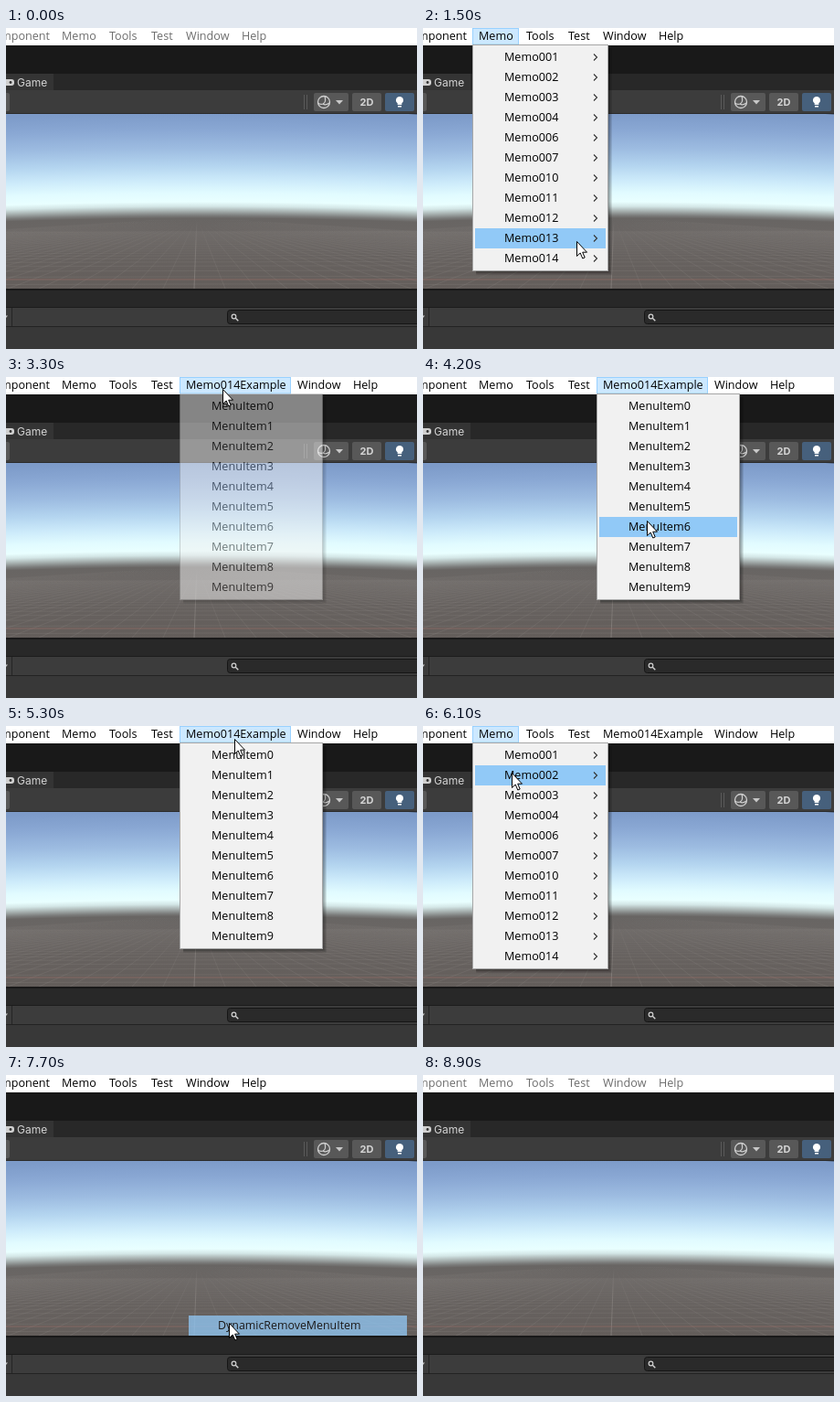
Recreate the animation shown at these times as an HTML page with a canvas. Size 450 by 351 pixels, loop 9 s.

```html
<!DOCTYPE html>
<html lang="en">
<head>
<meta charset="utf-8">
<title>Dynamic menu items</title>
<style>
html, body { margin: 0; width: 450px; height: 351px; overflow: hidden; background: #191919; }
canvas, svg { position: absolute; left: 0; top: 0; display: block; }
text { white-space: pre; }
.menu { font: 12.6px "Open Sans", "Noto Sans", sans-serif; }
.sub { font-size: 12.4px; }
.ui { font: 12px Inter, Roboto, sans-serif; fill: #d4d4d4; }
</style>
</head>
<body>
<canvas id="scene" width="450" height="351"></canvas>
<svg id="ui" width="450" height="351" viewBox="0 0 450 351"></svg>
<script>
const LOOP = 9000, STEP = 100, ROW = 22;
const svg = document.getElementById('ui');

function add(parent, tag, attrs, text) {
  const el = document.createElementNS('http://www.w3.org/2000/svg', tag);
  for (const k in attrs) el.setAttribute(k, attrs[k]);
  if (text) el.textContent = text;
  parent.appendChild(el);
  return el;
}
const box = (p, x, y, width, height, fill, more) => add(p, 'rect', { x, y, width, height, fill, ...more });
const label = (p, x, y, text, more) => add(p, 'text', { x, y, class: 'menu', ...more }, text);
const path = (p, d, more) => add(p, 'path', { d, fill: 'none', ...more });
const show = (el, opacity) => { el.style.opacity = opacity; el.style.display = opacity > 0 ? '' : 'none'; };

// Sky, ground and perspective grid
function drawScene() {
  const c = document.getElementById('scene').getContext('2d');
  const g = c.createLinearGradient(0, 94, 0, 285);
  const stops = [[94, '#7d9bc9'], [112, '#8aa8d4'], [132, '#9dbce1'], [150, '#b3d4ef'], [166, '#cceafa'],
    [180, '#e1fbff'], [190, '#e9ffff'], [195, '#d3e6e6'], [200, '#a8b2b1'], [205, '#7b7c7b'],
    [208, '#686563'], [220, '#6a6664'], [285, '#635d5a']];
  for (const [y, col] of stops) g.addColorStop((y - 94) / 191, col);
  c.save();
  c.beginPath();
  c.rect(0, 94, 450, 191);
  c.clip();
  for (let x = 0; x < 450; x++) {
    const dip = 4 * ((x - 215) / 225) ** 2;
    c.setTransform(1, 0, 0, 1, 0, dip);
    c.fillStyle = g;
    c.fillRect(x, 90, 1, 196);
  }
  c.setTransform(1, 0, 0, 1, 0, 0);
  const fade = (r, gr, b, a) => {
    const f = c.createLinearGradient(0, 209, 0, 285);
    f.addColorStop(0, `rgba(${r},${gr},${b},0)`);
    f.addColorStop(.4, `rgba(${r},${gr},${b},${a * .7})`);
    f.addColorStop(1, `rgba(${r},${gr},${b},${a})`);
    return f;
  };
  const line = (x1, y1, x2, y2, style) => {
    c.strokeStyle = style;
    c.beginPath();
    c.moveTo(x1, y1);
    c.lineTo(x2, y2);
    c.stroke();
  };
  c.lineWidth = 1;
  const thin = fade(175, 170, 165, .13), bold = fade(190, 185, 180, .3);
  for (let i = -36; i <= 36; i++) line(209, 207, 206 + i * 34, 285, i ? thin : bold);
  for (let d = 8; d < 40; d++) {
    const y = 207 + 580 / d;
    line(0, y + 1, 450, y, thin);
  }
  line(0, 275, 450, 275, 'rgba(165,115,105,.5)');
  c.restore();
}

function drawEditor() {
  box(svg, 0, 0, 450, 19, '#fff');
  box(svg, 0, 19, 450, 31, '#191919');
  box(svg, 0, 50, 450, 18, '#282828');
  box(svg, 0, 50, 52, 18, '#343434');
  box(svg, 0, 68, 450, 26, '#3c3c3c');
  box(svg, 0, 93, 450, 1, '#2b2b2b');
  box(svg, -4, 56, 13, 7, '#d0d0d0', { rx: 3 });
  add(svg, 'circle', { cx: 5, cy: 59.5, r: 1.4, fill: '#343434' });
  add(svg, 'text', { x: 12, y: 64, class: 'ui' }, 'Game');

  box(svg, -6, 71, 10, 20, '#585858', { rx: 2 });
  for (const x of [326, 329]) box(svg, x, 73, 1, 16, '#5a5a5a');
  box(svg, 337, 71, 38, 20, '#585858', { rx: 2 });
  box(svg, 379, 71, 32, 20, '#585858', { rx: 2 });
  box(svg, 415, 71, 32, 20, '#46607c', { rx: 2 });
  add(svg, 'circle', { cx: 348, cy: 81, r: 6.5, fill: 'none', stroke: '#d0d0d0', 'stroke-width': 1.3 });
  path(svg, 'M349 74.5Q351 81 347 83Q344 84 341.5 82M347 83Q350 85 354 82', { stroke: '#d0d0d0', 'stroke-width': 1.2 });
  path(svg, 'M361 79h8l-4 4.5z', { fill: '#c8c8c8' });
  add(svg, 'text', { x: 395, y: 85, class: 'ui', 'text-anchor': 'middle', style: 'font-size:11px;font-weight:700' }, '2D');
  path(svg, 'M431 75a4 4 0 0 1 2.3 7.3V84h-4.6v-1.7A4 4 0 0 1 431 75zM429 85h4v1.6h-4z', { fill: '#fff' });

  box(svg, 0, 285, 450, 2, '#191919');
  box(svg, 0, 287, 450, 18, '#282828');
  box(svg, 0, 305, 450, 1, '#1c1c1c');
  box(svg, 0, 306, 450, 20, '#3c3c3c');
  box(svg, 0, 326, 450, 1, '#222');
  box(svg, 0, 327, 450, 24, '#383838');
  box(svg, 6, 306, 1, 20, '#242424');
  path(svg, 'M-3 314.500h5l-2.500 3z', { fill: '#c4c4c4' });
  box(svg, 242.500, 308.500, 230, 15, '#2a2a2a', { rx: 3, stroke: '#151515' });
  add(svg, 'circle', { cx: 249.500, cy: 315.500, r: 2.300, fill: 'none', stroke: '#d2d2d2', 'stroke-width': 1.200 });
  path(svg, 'M251.300 317.300l3 3', { stroke: '#d2d2d2', 'stroke-width': 1.400 });
}

function makeHeader(x, w) {
  return box(svg, x + .5, .5, w - 1, 17.5, '#cce8ff', { stroke: '#99d1ff' });
}

function makePanel(x, y, w, rows, tx, arrows, cls = '') {
  const g = add(svg, 'g', {}), h = rows.length * ROW + 6;
  for (let i = 4; i > 0; i--) box(g, x + 4, y + 4, w - 4 + i, h - 4 + i, '#000', { opacity: .1, rx: 1 });
  box(g, x + .5, y + .5, w - 1, h - 1, '#f1f1f1', { stroke: '#a6a6a6' });
  const mark = box(g, x + 3, 0, w - 6, ROW, '#91c9f7');
  rows.forEach((name, i) => {
    const top = y + 3 + i * ROW;
    label(g, tx, top + 15, name, { class: 'menu ' + cls });
    if (arrows) path(g, `M${x + w - 16} ${top + 7.5}l3.500 3.500-3.500 3.500`, { stroke: '#333', 'stroke-width': 1.1 });
  });
  return {
    rows: rows.length,
    inside: (px, py) => px >= x + 3 && px < x + w && py >= y + 3 && py < y + h - 3,
    rowAt: py => Math.floor((py - y - 3) / ROW),
    update(opacity, row) {
      show(g, opacity);
      mark.setAttribute('y', y + 3 + row * ROW);
      show(mark, row < 0 ? 0 : 1);
    }
  };
}

drawScene();
drawEditor();

const memoHead = makeHeader(54, 51), newHead = makeHeader(190, 122);
const bar = add(svg, 'g', {});
label(bar, 48, 13, 'Component', { 'text-anchor': 'end' });
label(bar, 61, 13, 'Memo');
label(bar, 113, 13, 'Tools');
label(bar, 159, 13, 'Test');
const newText = label(bar, 197, 13, 'Memo014Example');
const windowText = label(bar, 197, 13, 'Window'), helpText = label(bar, 258, 13, 'Help');

const memoNames = [1, 2, 3, 4, 6, 7, 10, 11, 12, 13, 14].map(n => 'Memo' + String(n).padStart(3, '0'));
const itemNames = Array.from({ length: 10 }, (_, i) => 'MenuItem' + i);
const subNames = ['DynamicAddMenuItem', 'DynamicRemoveMenuItem'];
const memo = makePanel(54, 18, 149, memoNames, 89, true);
const items = makePanel(190, 18, 157, itemNames, 225, false);
const sub = makePanel(197, 238, 245, subNames, 232, false, 'sub');

// The chosen command lingers briefly after its menu closes
const picked = subNames.map((name, i) => {
  const g = add(svg, 'g', {}), y = 241 + i * ROW;
  box(g, 200, y, 239, ROW, '#91c9f7');
  label(g, 232, y + 15, name, { class: 'menu sub' });
  return g;
});

const pointer = path(svg, 'M.5.5V16.500L4.200 13l2.600 6 2.400-1-2.500-5.800H11.500z',
  { fill: '#fff', stroke: '#000', 'stroke-width': 1 });

// time, x, y of the pointer tip
const moves = [
  [100, 424, 150], [300, 370, 110], [700, 92, 14], [800, 80, 12], [1000, 82, 13], [1100, 90, 24],
  [1500, 168, 233], [1600, 176, 245], [2000, 182, 244], [2100, 208, 246], [2200, 230, 245],
  [2500, 230, 245], [2700, 231, 225], [3200, 236, 14], [3300, 237, 13], [3500, 237, 13],
  [3700, 239, 30], [4500, 248, 233], [4700, 248, 215], [5300, 250, 14], [5400, 248, 13],
  [5500, 241, 12], [5800, 100, 11], [5900, 84, 11], [6000, 86, 16], [6500, 140, 190],
  [6600, 146, 233], [6700, 160, 248], [7100, 182, 250], [7200, 214, 252], [7400, 243, 270],
  [7700, 244, 271], [7900, 258, 264], [8400, 438, 190], [8500, 460, 180]
];

function tip(t) {
  if (t < moves[0][0] || t >= 8500) return null;
  const i = moves.findIndex(m => m[0] > t);
  const [t0, x0, y0] = moves[i - 1], [t1, x1, y1] = moves[i];
  const k = (t - t0) / (t1 - t0);
  return [Math.round(x0 + (x1 - x0) * k), Math.round(y0 + (y1 - y0) * k)];
}

// Half strength on the first step, then full until closed
const opening = (t, from, to) => t < from || t >= to ? 0 : t < from + STEP ? .5 : 1;
const lingering = (t, from) => t < from || t >= from + 300 ? 0 : [1, .75, .35][(t - from) / STEP];

function header(el, open, hover) {
  el.setAttribute('fill', open ? '#cce8ff' : '#e5f3ff');
  el.setAttribute('stroke', open ? '#99d1ff' : '#cce8ff');
  show(el, open || hover ? 1 : 0);
}

function draw(now) {
  const t = Math.floor(now % LOOP / STEP) * STEP;
  const p = tip(t), [x, y] = p || [-99, -99];
  const extra = t >= 2600 && t < 7700;
  const memoOn = opening(t, 900, 2500) || opening(t, 5900, 7600);
  const itemsOn = opening(t, 3300, 5400);
  const subOn = opening(t, 1900, 2500) || opening(t, 7000, 7600);

  bar.setAttribute('fill', t < 800 || t >= 8900 ? '#6d6d6d' : '#000');
  show(newText, extra ? 1 : 0);
  windowText.setAttribute('x', extra ? 319 : 197);
  helpText.setAttribute('x', extra ? 380 : 258);

  const onBar = y >= 0 && y < 18;
  header(memoHead, memoOn > 0, onBar && x >= 54 && x < 105);
  header(newHead, itemsOn > 0, extra && onBar && x >= 190 && x < 312);

  const inSub = subOn && sub.inside(x, y);
  memo.update(memoOn, inSub ? memo.rows - 1 : memo.inside(x, y) ? memo.rowAt(y) : -1);
  items.update(itemsOn, items.inside(x, y) ? items.rowAt(y) : -1);
  sub.update(subOn, inSub ? sub.rowAt(y) : -1);
  show(picked[0], lingering(t, 2500));
  show(picked[1], lingering(t, 7600));

  show(pointer, p ? 1 : 0);
  pointer.setAttribute('transform', `translate(${x} ${y})`);
}

const start = performance.now();
function tick() {
  draw(performance.now() - start);
  requestAnimationFrame(tick);
}
tick();
</script>
</body>
</html>
```
